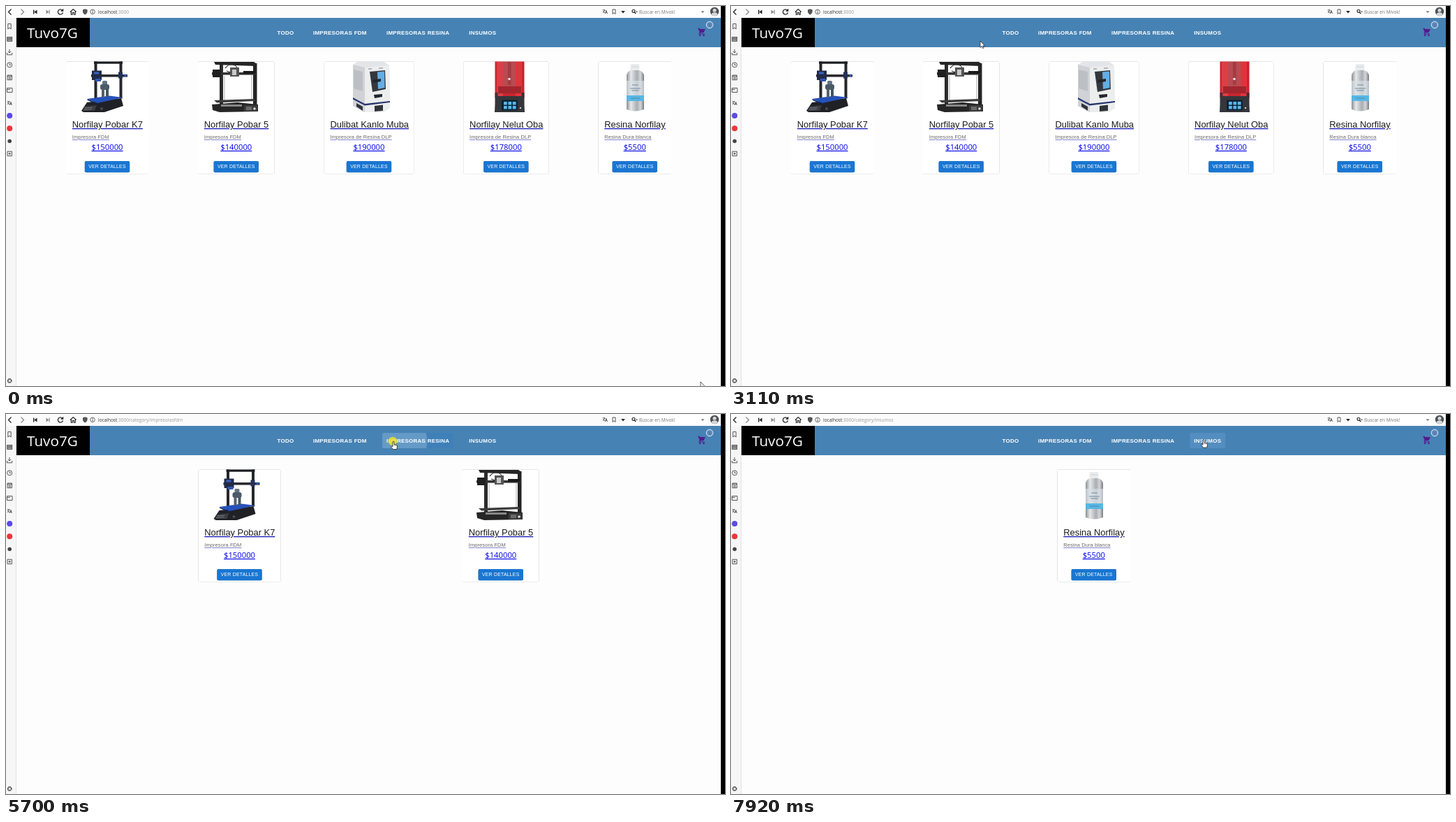
These frames come from a looping animation (1030 by 544 pixels, 8000 ms). An HTML page:

```html
<!DOCTYPE html>
<html lang="es">
<head>
<meta charset="utf-8">
<title>Tienda de impresoras</title>
<style>
  html, body { margin: 0; width: 100%; height: 100%; overflow: hidden; background: #fdfdfd; }
  svg { display: block; width: 100vw; height: 100vh; }
  text { font-family: "Liberation Sans", Arial, sans-serif; white-space: pre; }
  .ui, .price, .logo { font-family: "Open Sans", "Noto Sans", sans-serif; }
  .ui { font-size: 6.5px; fill: #777; }
  .logo { font-size: 20.7px; fill: #fff; }
  .nav { font-size: 8.03px; font-weight: bold; letter-spacing: .23px; fill: #fff; }
  .title { font-size: 12.9px; }
  .kind { font-size: 7.5px; letter-spacing: .08px; }
  .price { font-size: 11.25px; fill: #00e; }
  .title, .kind, .price { text-decoration: underline; }
  .button { font-size: 6.95px; letter-spacing: .2px; fill: #fff; }
  .paper { fill: #fff; filter: drop-shadow(0 .8px .7px rgba(0, 0, 0, .38)); }
  .raised { fill: #1976d2; filter: drop-shadow(0 .8px .7px rgba(0, 0, 0, .4)); }
  .line { fill: none; stroke: #444; stroke-width: .9; }
  .bold { fill: none; stroke: #222; stroke-width: 1.3; }
</style>
</head>
<body>
<svg id="stage" viewBox="0 0 1030 544" preserveAspectRatio="none"></svg>
<script>
const LOOP = 8000;

const rect = (x, y, w, h, fill, more = '') =>
  `<rect x="${x}" y="${y}" width="${w}" height="${h}" fill="${fill}" ${more}/>`;
const poly = (points, fill, more = '') => `<polygon points="${points}" fill="${fill}" ${more}/>`;
const dot = (x, y, r, fill, more = '') => `<circle cx="${x}" cy="${y}" r="${r}" fill="${fill}" ${more}/>`;
const path = (d, cls = 'line', more = '') => `<path class="${cls}" d="${d}" ${more}/>`;
const text = (x, y, cls, content, more = '') => `<text x="${x}" y="${y}" class="${cls}" ${more}>${content}</text>`;
const CENTER = 'text-anchor="middle"';

const blueFramePrinter = () =>
  poly('108,150 116,138 165,132 168,143 141,152 111,152', '#202126') +
  rect(126.5, 79.5, 4, 55, '#26272b') + rect(162.5, 79.5, 4, 53, '#26272b') +
  rect(126, 79.5, 41, 3.2, '#1d1e22') +
  rect(122, 98, 52, 3.6, '#2b2c30') + rect(123, 92.5, 14, 13.5, '#232a47') +
  rect(126, 94.5, 7, 3, '#3a62c4') + rect(128, 104, 8, 4, '#3156b0') +
  rect(161, 94.5, 6, 9, '#25305c') + dot(171, 99.5, 2, '#3658b2') +
  poly('116,133 148,128.5 168,131 131,139', '#2552bb') + poly('116,133 131,139 131,141 117,135', '#12245a') +
  rect(138, 107, 7, 6, '#62727f', 'rx="2"') + rect(135, 112, 13, 8, '#4a5a69', 'rx="3"') +
  rect(137, 119, 4, 12, '#53626f') + rect(143, 119, 4, 11, '#465561') +
  poly('112,144 130,142 127,150 110,150', '#3a3c42') + dot(137, 147, 2, '#4a4b50') +
  path('M113 146l11 -1M112 148.5l11 -1', 'line', 'style="stroke:#8a8f9a;stroke-width:.7"');

const blackFramePrinter = () =>
  rect(306, 82, 5, 58, '#2b2b2b') + rect(354, 82, 5.5, 64, '#242424') +
  poly('298,80 355,80 358,82 358,86 300,84', '#252525') +
  path('M314 89Q323 78 331 88Q329 99 316 93', 'line', 'style="stroke:#333;stroke-width:1.2"') +
  rect(295, 95, 63, 3.6, '#333') + rect(296, 91, 12, 11, '#1f1f1f') +
  rect(321, 88, 13, 13, '#555') + rect(324, 91, 6, 8, '#c9c9c9') + rect(340, 93, 17, 4, '#191919') +
  path('M313 100V136M352 98V136', 'line', 'style="stroke:#999;stroke-width:.8"') +
  poly('298,135 355,133 358,136 302,138.5', '#3c3c3c') +
  poly('295,141 332,138 361,141 361,151 306,152 296,149', '#262626') +
  rect(308, 141, 30, 3, '#888') + rect(341, 142, 19, 9, '#3b3b3b') + rect(344, 144, 8, 5, '#6a6a6a') + dot(356, 147, 1.8, '#ddd');

const whiteCasePrinter = () =>
  poly('497,84 504,79.5 541,79.5 549,85 550,146 541,152 513,152 497,143', '#e4e5e8') +
  poly('497,84 514,88 514,152 497,143', '#d0d2d6') + poly('514,88 549,85 550,146 541,152 514,152', '#eceded') +
  poly('498,91 511,94 511,122 498,118', '#bcc0c5') +
  poly('521,94 543,92 544,119 525,123', '#33383f') + poly('532,94.5 542,93.5 542.5,117 533,119', '#62aee6') +
  poly('525,106 537,104 537,108 526,110', '#22262b') +
  poly('497,131 514,140 550,136 550,138 514,142.5 497,133.5', '#26356f') +
  poly('527,127 539,126 539,130 528,132', '#23262c', 'rx="2"') +
  poly('528,143 540,141.5 540,150 528,151', '#30343a') + poly('502,139 511,144 511,150 502,144', '#30343a') +
  path('M519 90h5M534 89h6', 'line', 'style="stroke:#667;stroke-width:.8"');

const redHoodPrinter = () => {
  let icons = '';
  for (let i = 0; i < 6; i++) icons += rect(713 + (i % 3) * 6.4, 137 + (i >> 1 > 0 && i > 2 ? 6 : 0), 4.8, 4.6, '#58b7ef', 'rx=".6"');
  return rect(700.5, 79.5, 42, 52, '#c9252f') + rect(703, 80, 9, 49, '#dc3e45') + rect(712, 80, 18, 40, '#b84b52') +
    rect(719, 80, 4.5, 33, '#a33b43') + rect(730, 80, 9, 49, '#e0343d') + rect(705, 115, 33, 10, '#a3262e') +
    dot(721, 104.5, 1.8, '#f3dcdc') + rect(700.5, 124, 4, 28, '#4b3034') + rect(738.5, 124, 4, 28, '#3c3034') +
    poly('702,129 741,129 743,152 700,152', '#34363b') + rect(710, 134.5, 23, 15, '#102233', 'rx="1"') + icons +
    dot(737, 146, 1.2, '#ccc');
};

const resinBottle = () =>
  rect(894.5, 83, 13, 10, '#e9ebed', 'rx="2"') + path('M896 87H906', 'line', 'style="stroke:#cfd3d6"') +
  `<path d="M889 99Q890 94 895 92H907Q913 94 914 99V148Q901 153 889 148Z" fill="url(#metal)"/>` +
  rect(889, 107, 25, 21, '#d9e2e8', 'opacity=".65"') + rect(889, 128, 25, 8, '#55b7e6') +
  path('M897 113h9M894 118h15M896 121h11M895 132h13', 'line', 'style="stroke:#5d7888;stroke-width:.8"');

const cards = [
  { x: 86, w: 118, page: 1, shift: 189.5, title: 'Norfilay Pobar K7', kind: 'Impresora FDM', price: 150000, art: blueFramePrinter },
  { x: 275, w: 109.5, page: 1, shift: 379, title: 'Norfilay Pobar 5', kind: 'Impresora FDM', price: 140000, art: blackFramePrinter },
  { x: 455.7, w: 128.5, page: 2, shift: -188, title: 'Dulibat Kanlo Muba', kind: 'Impresora de Resina DLP', price: 190000, art: whiteCasePrinter },
  { x: 655.3, w: 122, page: 2, shift: -6, title: 'Norfilay Nelut Oba', kind: 'Impresora de Resina DLP', price: 178000, art: redHoodPrinter },
  { x: 848.5, w: 104.5, page: 3, shift: -381, title: 'Resina Norfilay', kind: 'Resina Dura blanca', price: 5500, art: resinBottle }
];

const links = [
  { x: 382.5, w: 35.5, label: 'TODO' },
  { x: 434, w: 89, label: 'IMPRESORAS FDM' },
  { x: 539, w: 102, label: 'IMPRESORAS RESINA' },
  { x: 657.3, w: 51, label: 'INSUMOS' }
];

const routes = ['', '/category/impresorasfdm', '/category/impresorasresina', '/category/insumos'];

const clicks = [
  { at: 4320, open: 4620, link: 1 },
  { at: 5510, open: 5810, link: 2 },
  { at: 7530, open: 7820, link: 3 }
];

// time, x, y of the pointer tip
const track = [
  [0, 995, 538], [660, 995, 538], [870, 626, 382], [1070, 626, 382], [1850, 155, 148],
  [2600, 155, 148], [3110, 357, 50], [3400, 403, 38], [3430, 403, 38], [4120, 461, 37.5],
  [5140, 461, 37.5], [5330, 555, 39], [6300, 555, 39], [6620, 657, 37], [6940, 677, 36.5], [LOOP, 677, 36.5]
];

const underlined = (x, y, cls, content, line, ink) =>
  text(x, y, cls, `<tspan fill="${ink}">${content}</tspan>`, `fill="${line}"`);

const cardMarkup = (c, i) => {
  const mid = c.x + c.w / 2;
  return `<g id="card${i}">` +
    `<rect class="paper" x="${c.x}" y="79.5" width="${c.w}" height="160.8" rx="2"/>` + c.art() +
    underlined(c.x + 8.8, 174, 'title', c.title, '#1616b4', '#1c1c1c') +
    underlined(c.x + 8.8, 190.3, 'kind', c.kind, '#5a5ac4', '#6b6b6b') +
    text(mid, 206, 'price', '$' + c.price, CENTER) +
    rect(c.x, 79.5, c.w, 138, '#000', `id="shade${i}" opacity="0"`) +
    `<rect class="raised" x="${mid - 32.2}" y="222" width="64.4" height="16.3" rx="2"/>` +
    text(mid, 232.3, 'button', 'VER DETALLES', CENTER) + '</g>';
};

const linkMarkup = (l, i) =>
  rect(l.x, 27, l.w, 22, '#1976d2', `id="glow${i}" rx="2" opacity="0"`);

const toolbar = () =>
  rect(0, 0, 1024, 17, '#fbfbfb') +
  path('M7.5 4.5L3.5 8.5L7.5 12.5', 'bold') + path('M21.5 4.5L25.5 8.5L21.5 12.5', 'bold', 'style="stroke:#888"') +
  rect(39, 5.5, 1.4, 6, '#222') + poly('44.5,5.5 44.5,11.5 40.4,8.5', '#222') +
  poly('57.5,5.5 57.5,11.5 61.5,8.5', '#888') + rect(61.5, 5.5, 1.2, 6, '#888') +
  path('M80.8 6.2A3.6 3.6 0 1 0 81.5 9.3M81.6 4.3V7H78.8', 'bold') +
  path('M92 8.5L96.3 4.5L100.6 8.5M93.3 8V12.3H95.2V9.5H97.4V12.3H99.3V8', 'bold', 'style="stroke-width:1.1"') +
  `<path d="M110 5.2L113.3 4.2L116.6 5.2V8.6Q116 11.4 113.3 12.6Q110.6 11.4 110 8.6Z" fill="#555"/>` +
  dot(124, 8.3, 3.3, 'none', 'stroke="#444" stroke-width=".8"') + rect(123.5, 7.6, 1, 2.8, '#444') + rect(123.5, 6, 1, 1, '#444') +
  `<text x="132" y="10.8" class="ui"><tspan fill="#333">localhost</tspan><tspan id="route" fill="#999"></tspan></text>` +
  `<g id="traffic">` + text(823.5, 10.3, 'ui', '2 kB', 'style="font-size:5.3px;fill:#333"') +
  text(841, 10.3, 'ui', '1/0', 'style="font-size:5.3px;fill:#333"') + '</g>' +
  translateIcon(858, 8) + path('M869 5H873V11.5L871 9.6L869 11.5Z', 'line') +
  poly('881.2,7 886.8,7 884,10.5', '#222') + rect(893, 2, 111, 13, '#fff') +
  dot(899, 7.3, 2, 'none', 'stroke="#222" stroke-width="1.1"') + path('M900.5 9L902.3 11', 'bold') + poly('902.2,7.5 905,7.5 903.6,9.2', '#333') +
  text(907, 10.8, 'ui', 'Buscar en Mivok!') + poly('995.5,7.2 1000.5,7.2 998,10', '#777') +
  dot(1015, 8, 6.2, '#4d5157') + dot(1015, 6.2, 2.5, '#d8d8d8') + `<path d="M1010.6 12.2Q1011 9.2 1015 9.2Q1019 9.2 1019.4 12.2Q1015 16 1010.6 12.2Z" fill="#d8d8d8"/>`;

const translateIcon = (x, y) =>
  path(`M${x - 3.2} ${y - 2.3}h3.6M${x - 2.6} ${y + 2}l2.4 -4M${x - 2.8} ${y - 1}l2.6 2.8M${x + .4} ${y + 2.8}l1.5 -4.4l1.5 4.4M${x + .9} ${y + 1.4}h2`);

const sidebar = () =>
  rect(0, 17, 15, 527, '#f6f6f6') + rect(14.2, 17, .8, 527, '#dedede') +
  path('M2.8 25.5H7.2V33L5 31L2.8 33Z') +
  rect(1.7, 44.5, 7, 6, '#999', 'stroke="#444" stroke-width=".8"') + path('M2 47H8.5') +
  path('M5 62V67M2.8 65L5 67.2L7.2 65M1.5 67V69.8H8.7V67') +
  dot(5.2, 84.3, 3.5, 'none', 'stroke="#444" stroke-width=".9"') + path('M5.2 82V84.5H7') +
  path('M2 99H8.4V105.8H2ZM2 100.5H8.4M3.5 102.5H7M3.5 104.2H7') +
  path('M1.5 117.5H9V123.5H1.5ZM1.5 119.4H6') + translateIcon(5, 139) +
  dot(5.2, 157, 4, '#5a4be0') + dot(5.2, 175.3, 4, '#e8363b') + dot(5.2, 193.5, 2.8, '#444') +
  path('M2 208.2H8.4V214.6H2ZM5.2 209.6V213.2M3.4 211.4H7') +
  dot(5.2, 536.5, 2.7, 'none', 'stroke="#444" stroke-width="1.5" stroke-dasharray="1.4 .72"') +
  dot(5.2, 536.5, 2.2, 'none', 'stroke="#444" stroke-width=".8"');

const cart = () =>
  `<g fill="#551a8b"><path d="M991.5 31.7H993.6L994.2 33H1002L999.6 37.6Q999.2 38.2 998.4 38.2H994.8L994.1 39.4H1001V40.6H993.2Q992 40.4 992.6 39L993.6 37.3L991.8 33H991.5Z"/>` +
  `<circle cx="994.2" cy="42" r="1.2"/><circle cx="999.5" cy="42" r="1.2"/></g>` +
  dot(1008, 27, 4.8, '#5f8fc0', 'stroke="#e6eaf0" stroke-width="1"') +
  text(1008, 28.8, 'ui', '0', CENTER + ' style="font-size:5px;fill:#4a3f9b"');

const pointers = () =>
  `<g id="arrow"><path d="M0 0V9.4L2.2 7.5L3.7 10.6L5.1 10L3.7 7H6.6Z" fill="#fff" stroke="#111" stroke-width=".7"/></g>` +
  `<g id="hand"><path d="M-1 .8Q0 -.8 1 .8V4.4L4.6 5.2Q5.8 5.6 5.6 7L4.8 11.6H-.6L-3.5 7.6Q-3.4 6.2 -2.2 6.8L-1 7.8Z" fill="#fff" stroke="#222" stroke-width=".8"/>` +
  path('M1.2 4.8V6.6M2.8 5.2V6.8M4.3 5.5V7', 'line', 'style="stroke-width:.6"') + '</g>';

const stage = document.getElementById('stage');
stage.innerHTML =
  `<defs><linearGradient id="metal"><stop offset="0" stop-color="#8b8f93"/><stop offset=".25" stop-color="#e6e8ea"/>` +
  `<stop offset=".6" stop-color="#a9adb1"/><stop offset=".8" stop-color="#d5d7d9"/><stop offset="1" stop-color="#777b80"/></linearGradient>` +
  `<clipPath id="bounds"><rect id="clip" y="27" height="22" rx="2"/></clipPath></defs>` +
  rect(0, 0, 1030, 544, '#fdfdfd') + cards.map(cardMarkup).join('') + toolbar() + sidebar() +
  rect(15, 17, 1009, 42, '#4682b4') + rect(15, 17, 105, 42, '#000') + text(30, 46.3, 'logo', 'Tuvo7G') +
  links.map(linkMarkup).join('') +
  `<g clip-path="url(#bounds)">${dot(0, 0, 0, '#fff', 'id="ripple"')}</g>` +
  links.map(l => text(l.x + 6, 40.8, 'nav', l.label)).join('') +
  cart() + rect(1024, 0, 6, 544, '#000') + dot(0, 0, 6.3, '#ece22a', 'id="press"') + pointers();

const el = {};
stage.querySelectorAll('[id]').forEach(node => el[node.id] = node);
const set = (id, attrs) => { for (const key in attrs) el[id].setAttribute(key, attrs[key]); };
const show = (id, on) => set(id, { visibility: on ? 'visible' : 'hidden' });
const clamp = v => Math.min(1, Math.max(0, v));
const smooth = v => v * v * (3 - 2 * v);

function pointerAt(t) {
  const time = Math.max(0, t);
  const i = Math.max(1, track.findIndex(k => k[0] >= time));
  const [a, b] = [track[i - 1], track[i]];
  const p = smooth(clamp((time - a[0]) / (b[0] - a[0])));
  return { x: a[1] + (b[1] - a[1]) * p, y: a[2] + (b[2] - a[2]) * p };
}

const within = (p, box, top, height) =>
  p.x >= box.x && p.x <= box.x + box.w && p.y >= top && p.y <= top + height;

// Share of the last 150 ms spent over a box: a linear fade in and out.
function hover(t, box, top, height) {
  let hits = 0;
  for (let i = 0; i < 10; i++) hits += within(pointerAt(t - i * 15), box, top, height);
  return hits / 10;
}

function render(t) {
  const page = clicks.filter(c => t >= c.open).length;
  const pos = pointerAt(t);

  cards.forEach((c, i) => {
    show('card' + i, page === 0 || c.page === page);
    set('card' + i, { transform: `translate(${page ? c.shift : 0} 0)` });
    set('shade' + i, { opacity: page ? 0 : .045 * hover(t, c, 79, 138) });
  });
  links.forEach((l, i) => set('glow' + i, { opacity: .15 * hover(t, l, 27, 22) }));

  el.route.textContent = ':3000' + routes[page];
  show('traffic', page === 2);

  const click = clicks.filter(c => t >= c.at).pop();
  const age = click ? t - click.at : Infinity;
  show('ripple', age < 560);
  show('press', age < 300);
  if (click) {
    const { x, w } = links[click.link];
    const origin = pointerAt(click.at);
    set('clip', { x, width: w });
    set('ripple', {
      cx: origin.x, cy: origin.y,
      r: w * .9 * smooth(clamp(age / 370)),
      opacity: .2 * clamp((560 - age) / 310)
    });
    set('press', { cx: origin.x - 1, cy: origin.y, opacity: .85 * clamp((300 - age) / 80) });
  }

  const overLink = links.some(l => within(pos, l, 27, 22));
  const overCard = page === 0 && cards.some(c => within(pos, c, 79, 138));
  const hand = overLink || overCard;
  show('hand', hand);
  show('arrow', !hand);
  set(hand ? 'hand' : 'arrow', { transform: `translate(${pos.x} ${pos.y})` });
}

const start = performance.now();
function tick() {
  render((performance.now() - start) % LOOP);
  requestAnimationFrame(tick);
}
tick();
</script>
</body>
</html>
```
